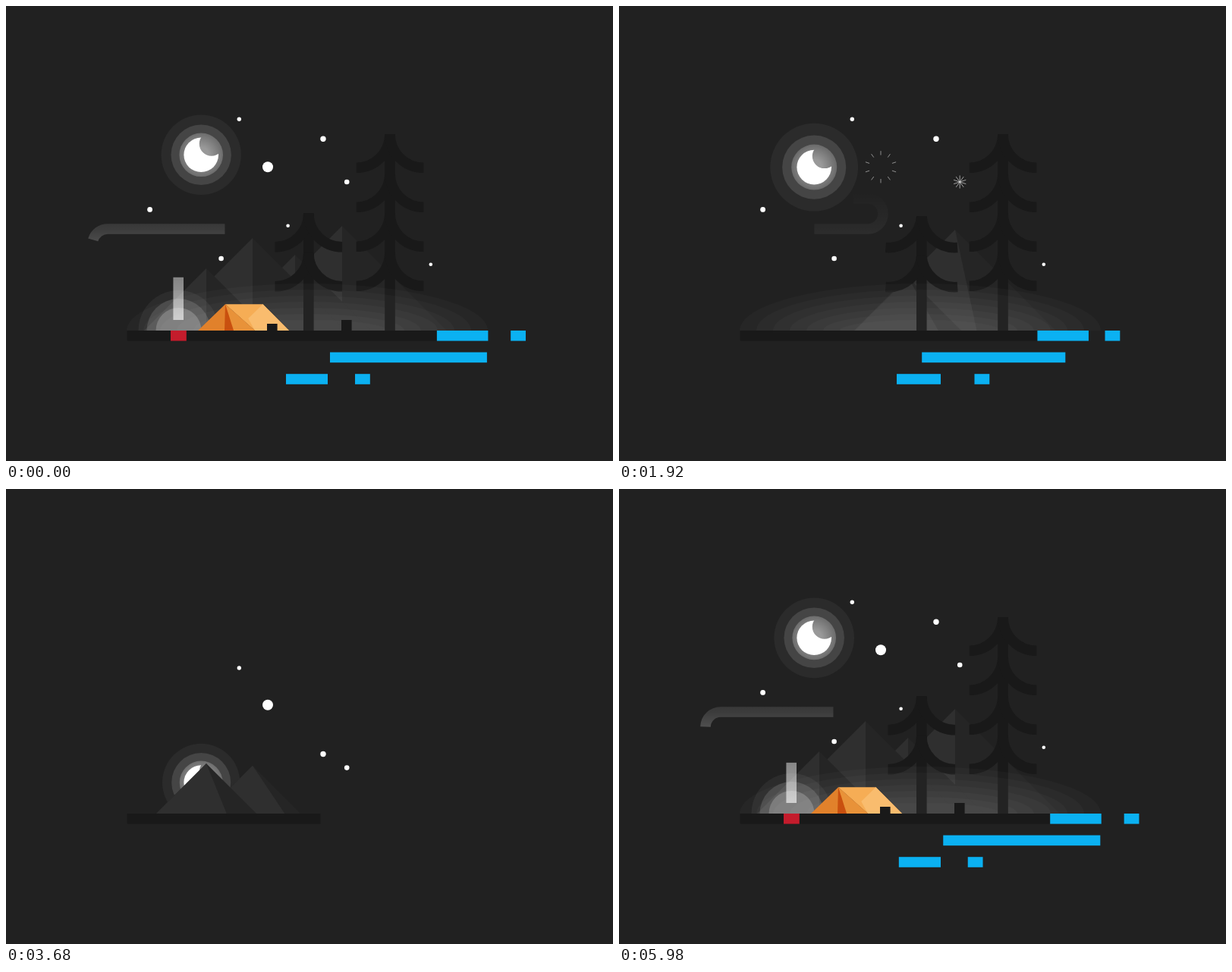
Animation, 800 px wide and 600 px high, one loop 6000 ms. Source, as an HTML page with a canvas:

```html
<!DOCTYPE html>
<html lang="en">
<head>
<meta charset="utf-8">
<title>Night camp</title>
<style>
  html, body { margin: 0; width: 100%; height: 100%; overflow: hidden; background: #212121; }
  canvas { display: block; }
</style>
</head>
<body>
<canvas id="stage" width="800" height="600"></canvas>
<script>
const ctx = document.getElementById('stage').getContext('2d');
const LOOP = 6000, GROUND = 428, BAR = 13.6, TAU = Math.PI * 2, DEG = Math.PI / 180;

// Scene clock: the camp builds from 3000 and is packed away by 9000.
let T = 0;

const clamp = v => Math.min(1, Math.max(0, v));
const ramp = (start, dur) => clamp((T - start) / dur);
const left = (start, dur) => 1 - ramp(start, dur);
const smooth = p => p * p * (3 - 2 * p);
const outCubic = p => 1 - (1 - p) ** 3;
const mix = (a, b, p) => a + (b - a) * p;
const white = a => `rgba(255,255,255,${a})`;

// Smooth curve through [time, value] points.
function track(pts) {
  const n = pts.length - 1;
  if (T <= pts[0][0]) return pts[0][1];
  if (T >= pts[n][0]) return pts[n][1];
  const slope = i => {
    const a = pts[Math.max(0, i - 1)], b = pts[Math.min(n, i + 1)];
    return (b[1] - a[1]) / (b[0] - a[0]);
  };
  let i = 0;
  while (T >= pts[i + 1][0]) i++;
  const [t0, v0] = pts[i], [t1, v1] = pts[i + 1];
  const d = t1 - t0, p = (T - t0) / d, e = smooth(p);
  return mix(v0, v1, e) + d * p * (1 - p) * ((1 - p) * slope(i) - p * slope(i + 1));
}

function disc(x, y, r, fill) {
  ctx.fillStyle = fill;
  ctx.beginPath();
  ctx.arc(x, y, r, 0, TAU);
  ctx.fill();
}

function poly(fill, ...pts) {
  ctx.fillStyle = fill;
  ctx.beginPath();
  pts.forEach(p => ctx.lineTo(...p));
  ctx.closePath();
  ctx.fill();
}

function box(x, y, w, h, fill, alpha = 1) {
  ctx.globalAlpha = alpha;
  ctx.fillStyle = fill;
  ctx.fillRect(x, y, w, h);
  ctx.globalAlpha = 1;
}

// x, y, radius, rise start, burst start
const STARS = [
  [307.3, 149.3, 2.7, 3193, 7980], [345, 212.3, 7, 3247, 7740],
  [418, 175.3, 3.7, 3509, 8335], [449.2, 232, 3.3, 3519, 7848],
  [189.6, 268.4, 3.4, 3701, 8130], [371.6, 289.8, 2.3, 3855, 8190],
  [283.6, 333, 3.3, 3692, 8425], [559.8, 340.8, 2.3, 3779, 8170]
];

function star([x, y, r, rise, burst]) {
  if (T < rise) return;
  if (T < burst) {
    const rest = Math.max(0, (432 - y) ** 0.25 - 0.00215 * (T - rise));
    disc(x, y + rest ** 4, r, '#fff');
    return;
  }
  const p = ramp(burst, 300);
  if (p === 1) return;
  const outer = 35 * p, inner = 35 * clamp((p - 0.28) / 0.72);
  ctx.strokeStyle = white(0.62 - 0.2 * p);
  ctx.lineWidth = 1;
  ctx.beginPath();
  for (let i = 0; i < 10; i++) {
    const a = i * TAU / 10 - TAU / 4;
    ctx.moveTo(x + inner * Math.cos(a), y + inner * Math.sin(a));
    ctx.lineTo(x + outer * Math.cos(a), y + outer * Math.sin(a));
  }
  ctx.stroke();
}

function moon() {
  const p = ramp(7340, 860);
  const rise = Math.max(0, 3.718 - 0.00172 * (T - 3680)) ** 4;
  const y = 196.3 + Math.min(rise, 300) + 289 * (2.70158 * p ** 3 - 1.70158 * p ** 2);
  if (y > 490) return;
  const x = 257.2, g = -Math.cos((T - 500) / 3000 * TAU);
  disc(x, y, 54.5 + 3.5 * g, white(0.042));
  disc(x, y, 40.5 + 1.6 * g, white(0.12));
  const halo = ctx.createRadialGradient(x, y, 10, x, y, 30);
  halo.addColorStop(0, white(0.45));
  halo.addColorStop(1, white(0.2));
  disc(x, y, 29.2 + 0.8 * g, halo);
  ctx.save();
  ctx.beginPath();
  ctx.rect(x - 40, y - 40, 80, 80);
  ctx.arc(x + 13.6, y - 14.5, 16, 0, TAU);
  ctx.clip('evenodd');
  disc(x, y, 22.8, '#fff');
  ctx.restore();
}

function mountain(x, top, start, end) {
  const u = left(start, 1000), p = ramp(end, 420);
  if (u === 1 || p === 1) return;
  const y = top + (GROUND - top) * (u ** 4 + p ** 3);
  const h = GROUND - y, skew = u ** 2.2 + p ** 1.4;
  poly('#252525', [x, y], [x + h, GROUND], [x - h, GROUND]);
  poly('#2f2f2f', [x, y], [x + skew * h, GROUND], [x - h, GROUND]);
}

function tree(x, top, tiers, start, end) {
  const h = GROUND - top;
  const q = left(start, 1000) ** 3, p = ramp(end, 420);
  if (q === 1 || p === 1) return;
  const lift = 45 * Math.min(1, 1.4 * p ** 2.2);
  ctx.save();
  ctx.translate(x, GROUND + q * h + p ** 3 * (h + 14));
  ctx.rotate(50 * Math.sqrt(q) * DEG);
  box(-BAR / 2, -h, BAR, h, '#191919');
  ctx.strokeStyle = '#191919';
  ctx.lineWidth = BAR;
  for (let k = 0; k < tiers; k++) {
    const fold = Math.min(45, 48 * q + 14 * k * Math.min(1, q * 8));
    for (const side of [-1, 1]) {
      ctx.save();
      ctx.translate(0, 52 * k - h);
      ctx.scale(side, 1);
      ctx.rotate((fold - lift) * DEG);
      ctx.beginPath();
      ctx.arc(44.3, 0, 44.3, Math.PI, Math.PI / 2, true);
      ctx.stroke();
      ctx.restore();
    }
  }
  ctx.restore();
}

// Layered light along the ground
function haze(from, to) {
  const a = ramp(3800, 600) * left(8000, 350);
  for (let i = from; i < to; i++) {
    ctx.fillStyle = white(0.023 * a);
    ctx.beginPath();
    ctx.ellipse(397, GROUND, 238 - 22 * i, 62 - 8 * i, 0, Math.PI, TAU);
    ctx.fill();
  }
}

const smokeFill = ctx.createLinearGradient(0, 414, 0, 245);
[[0, 0.62], [0.33, 0.45], [0.47, 0.3], [0.71, 0.12], [1, 0]]
  .forEach(([at, a]) => smokeFill.addColorStop(at, white(a)));

const smokePath = new Path2D(
  'M227.2 414V354A20 20 0 0 0 207.2 334H134A20 20 0 0 1 134 294H328A20 20 0 0 0 328 254H250');

function smoke(headPts, tailPts) {
  const head = track(headPts), tail = Math.max(0, track(tailPts));
  const alpha = clamp((560 - head) / 160);
  if (head - tail < 0.1 || !alpha) return;
  ctx.save();
  ctx.globalAlpha = alpha;
  ctx.strokeStyle = smokeFill;
  ctx.lineWidth = BAR;
  ctx.setLineDash([head - tail, 2000]);
  ctx.lineDashOffset = -tail;
  ctx.stroke(smokePath);
  ctx.restore();
}

function fireGlow() {
  const s = outCubic(ramp(4450, 400)) * left(7300, 300);
  const g = 1 - 0.5 * (1 + Math.cos(T / 2000 * TAU));
  [[53, 4, 0.05], [42, 2, 0.13], [30, 2, 0.2]].forEach(([r, grow, a]) =>
    disc(227.5, GROUND, (r + grow * g) * s, white(a)));
}

function tent() {
  const out = left(7350, 330);
  const e1 = outCubic(ramp(4235, 380)) * out;
  const e2 = outCubic(ramp(4300, 400)) * out;
  if (e1 <= 0) return;
  const L = [253 - 10 * (1 - e1), GROUND], R = [373 - 28 * (1 - e2), GROUND];
  const A = [289 + 30 * (1 - e1), GROUND - 34.7 * e1];
  const B = [338.5 + 12 * (1 - e2), GROUND - 34.7 * e2];
  const open = clamp((e2 - 0.4) / 0.6);
  const fold = [328, GROUND];
  const M = [mix(327, (A[0] + B[0]) / 2, open), mix(GROUND, (A[1] + B[1]) / 2, open)];

  ctx.fillStyle = '#f6ad55';
  ctx.beginPath();
  ctx.moveTo(...A);
  ctx.quadraticCurveTo(mix(A[0] + 24, M[0], open), mix(A[1] + 3, A[1], open), ...M);
  ctx.quadraticCurveTo(mix(M[0] + 3, M[0], open), mix(B[1], M[1], open), ...B);
  ctx.quadraticCurveTo(mix(R[0] - 5, B[0], open), B[1], ...R);
  ctx.lineTo(...fold);
  ctx.closePath();
  ctx.fill();

  ctx.globalAlpha = open;
  poly('#f9bc6e', [mix(A[0], R[0], 0.36), 412], B, R, fold);
  ctx.globalAlpha = 1;
  poly('#e1812b', L, A, fold);
  ctx.globalAlpha = open;
  poly('#e89239', A, [300, GROUND], fold);
  poly('#c9500f', A, [288, GROUND], [300, GROUND]);
  ctx.globalAlpha = 1;
}

function stump(x, h, start) {
  const up = h * smooth(ramp(start, 300)) * (1 - smooth(ramp(start + 950, 300)));
  box(x, GROUND - up, BAR, up, '#191919');
}

function wave(x, row, w, start, rise, fade) {
  box(x, GROUND + 28.6 * row, w * outCubic(ramp(start, 380)), BAR, '#0bb1f2',
    ramp(start, rise) * fade);
}

function water(fade) {
  const end = track([[4300, 685.5], [5120, 692], [5740, 690], [6000, 685], [6640, 668.5],
    [7000, 661], [7440, 658.5], [7920, 660.3], [8420, 668.5], [8700, 673]]);
  const mid = track([[4300, 411.5], [5000, 420], [5800, 428], [6000, 427], [7000, 412.3],
    [7920, 399.2], [8420, 398.8], [8700, 401]]);
  const low = track([[4500, 360], [5300, 360], [6000, 369], [6700, 373], [7000, 372.2],
    [7920, 366], [8420, 358], [8700, 354]]);
  const bit = track([[4500, 455], [5300, 449], [6000, 460], [7000, 472], [7400, 473],
    [7920, 468.5], [8420, 459], [8700, 453]]);
  wave(551.7 + (end - 660.7) / 1.5, 0, 67.5, 4230, 200, fade);
  wave(end - 19.8, 0, 19.8, 4390, 370, fade);
  wave(mid, 1, 189 + 0.64 * (mid - 399), 4304, 370, fade);
  wave(low, 2, 424 - low, 4490, 370, fade);
  wave(bit, 2, 19.8, 4560, 370, fade);
}

function draw(now) {
  const t = now % LOOP;
  T = t < 3000 ? t + LOOP : t;
  box(0, 0, 800, 600, '#212121');

  ctx.save();
  ctx.beginPath();
  ctx.rect(0, 0, 800, GROUND);
  ctx.clip();
  STARS.forEach(star);
  moon();
  mountain(443, 290, 3914, 7781);
  mountain(381, 328, 3690, 7640);
  mountain(325, 306, 3514, 7490);
  mountain(264, 346, 3345, 7380);
  haze(2, 7);
  smoke([[4330, 0], [4360, 6], [5100, 136], [5980, 375], [6000, 381], [6600, 545], [6700, 572]],
    [[4980, 0], [5980, 196], [6000, 201], [6700, 375]]);
  tree(506, 169, 4, 4080, 8060);
  tree(398.8, 273.5, 2, 3850, 7800);
  haze(0, 2);
  fireGlow();
  smoke([[5600, 0], [5980, 53], [6000, 56], [7000, 278], [7920, 502], [8200, 570]],
    [[6350, 0], [7000, 113], [7920, 350], [8200, 420]]);
  tent();
  stump(344, 9, 5450);
  stump(442, 14, 5350);
  ctx.restore();

  const fade = left(8370, 340);
  box(159.6, GROUND, 408.4 * smooth(ramp(3300, 653)), BAR, '#191919', fade);
  box(217, GROUND, 20.8, BAR, '#c41c2c', ramp(4310, 250) * left(7350, 250));
  water(fade);
}

function tick() {
  draw(performance.now());
  requestAnimationFrame(tick);
}
tick();
</script>
</body>
</html>
```
